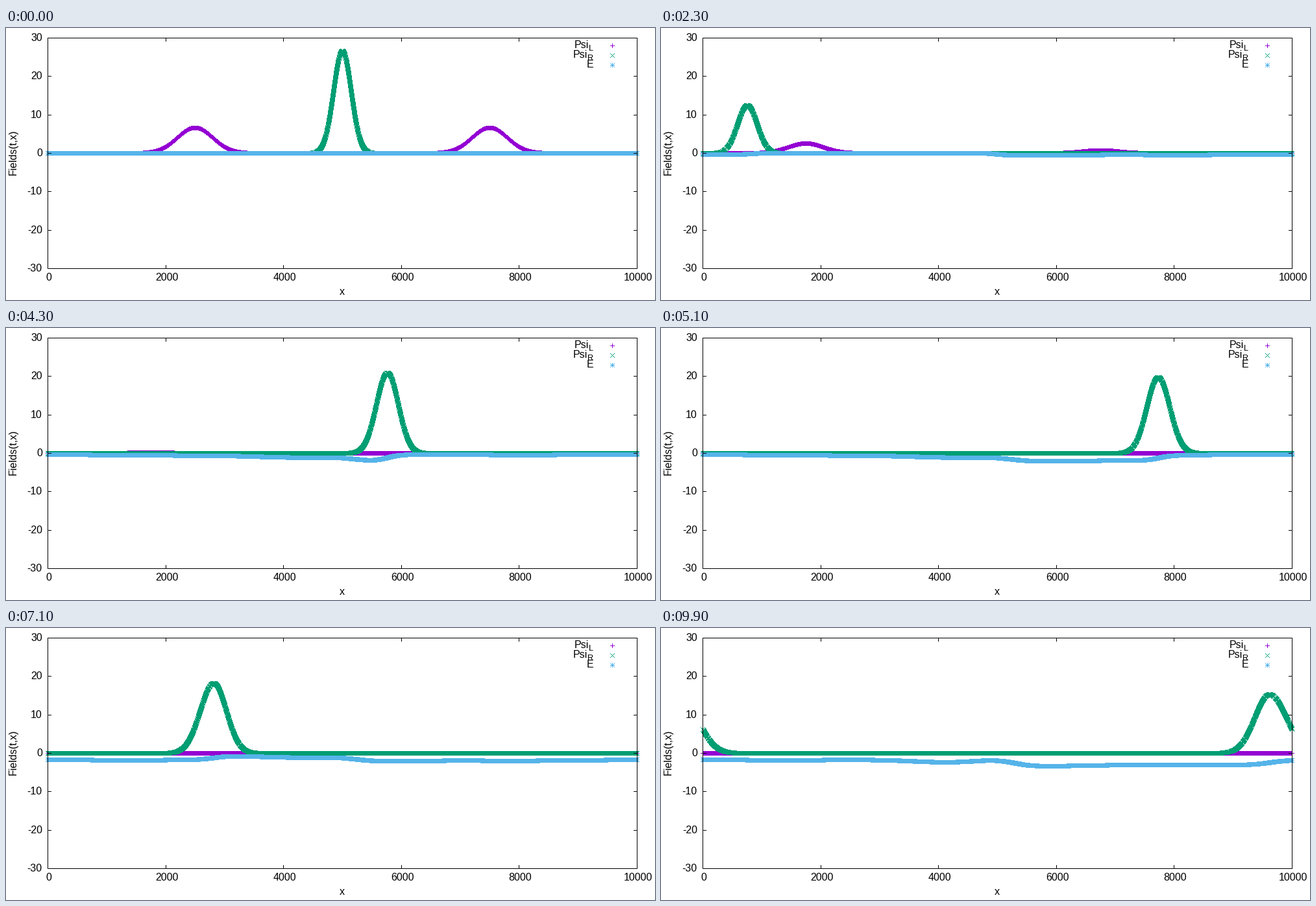
Write a matplotlib script that moves like this. It is 1000x420 px and loops after 10000 ms.

```python
import numpy as np
import matplotlib.pyplot as plt
from matplotlib.animation import FuncAnimation
from matplotlib.path import Path

W, H, DPI = 1000, 420, 100
FRAMES, INTERVAL = 100, 100
LEFT, RIGHT, TOP, BOTTOM = 64, 972, 15, 371
LENGTH, SPEED = 10000, 250
PX = 72 / DPI
PURPLE, GREEN, BLUE = "#9400d3", "#009e73", "#56b4e9"

# Key points, joined by cosine easing
AREA = ([0, 3, 7, 14, 24, 43, 60, 82, 99],
        [10000, 10000, 5500, 5220, 5180, 9750, 9550, 10700, 10280])
DRIFT = ([0, 43, 60, 82, 99], [0, 15, -65, 200, -130])
TRAIL = ([5000, 7000, 8000, 9000, 10000, 12500, 14600, 15000, 15600,
          20000, 23100, 24000, 25000, 25800, 27600, 30000],
         [0.33, 0.33, 0.5, 0.38, 0.38, 0.6, 1.18, 1.08, 1.65,
          1.38, 1.12, 1.25, 0.7, 1.35, 1.1, 1.35])

plt.rcParams["font.family"] = "Liberation Sans"
fig = plt.figure(figsize=(W / DPI, H / DPI), dpi=DPI, facecolor="white")
ax = fig.add_axes([0, 0, 1, 1])
ax.set_xlim(0, W)
ax.set_ylim(H, 0)
ax.axis("off")

x = np.arange(LENGTH + 1)


def glide(keys, t):
    ts, vs = map(np.array, keys)
    t = np.clip(t, ts[0], ts[-1])
    i = np.clip(np.searchsorted(ts, t, "right") - 1, 0, len(ts) - 2)
    s = (t - ts[i]) / (ts[i + 1] - ts[i])
    return vs[i] + (vs[i + 1] - vs[i]) * (1 - np.cos(np.pi * s)) / 2


def step(z):
    return 0.5 * (1 + np.tanh(0.851 * z))


def bell(center, left, right):
    d = (x - center + LENGTH / 2) % LENGTH - LENGTH / 2
    return np.exp(-0.5 * (d / np.where(d < 0, left, right)) ** 2)


def width(t):
    return 150 + 0.55 * t + 0.0065 * t ** 2


def front(t):
    return 5000 + SPEED * t + glide(DRIFT, t)


def psi_left(t):
    # each meeting with the right mover changes the strength
    a = (1 - 0.62 * step(t - 5)) * (1 + 0.4 * step(t - 25))
    a *= 1 - step((t - 37) / 2.2)
    b = (1 - 0.88 * step(t - 14)) * (1 - 0.78 * step((t - 32) / 6))
    b *= t < 44
    peak = 5000 / (300 * np.sqrt(2 * np.pi))
    return peak * (a * bell(7500 - SPEED * t, 300, 300)
                   + b * bell(2500 - SPEED * t, 300, 300))


def psi_right(t):
    w, skew = width(t), glide(DRIFT, t) / 2000
    peak = glide(AREA, t) / (w * np.sqrt(2 * np.pi))
    return peak * bell(front(t), w * (1 + skew), w * (1 - skew))


def field(t):
    # the right mover leaves a deeper field behind on every lap
    total = np.zeros(len(x))
    for lap in range(3):
        u = x + lap * LENGTH
        depth = glide(TRAIL, u)
        if lap == 0:
            depth = depth + 0.2 * step((12500 - SPEED * t - x) / 300)
        total -= depth * (step((u - 5000) / 150)
                          - step((u - front(t)) / width(t)))
    return total


def to_px(values):
    col = np.rint(LEFT + x * (RIGHT - LEFT) / LENGTH).astype(int)
    row = np.rint(193 - values * (BOTTOM - TOP) / 60).astype(int)
    code = np.unique(col * 1000 + row)
    return code // 1000, code % 1000


def box(px, py, w=1, h=1):
    return Path([(px, py), (px + w, py), (px + w, py + h), (px, py + h),
                 (px, py)], closed=True)


# Markers built from whole pixels, 7 by 7
PLUS = [box(-3, -1, 7, 1), box(0, -4, 1, 7)]
CROSS = [box(k, s * k - 1) for k in range(-3, 4) for s in (-1, 1)]


def points(shape, color, z):
    return ax.plot([], [], ls="none", marker=Path.make_compound_path(*shape),
                   ms=8 * PX, mew=0, mec="none", mfc=color, zorder=z)[0]


def line(xs, ys):
    ax.plot(xs, ys, color="black", lw=PX, antialiased=False, snap=True,
            solid_capstyle="projecting", solid_joinstyle="miter", zorder=8)


def label(px, py, text, ha="center", size=16, **kw):
    ax.text(px, py, text, ha=ha, va="baseline", fontsize=size * PX,
            color="black", zorder=9, **kw)


def draw_axes():
    line([LEFT, RIGHT, RIGHT, LEFT, LEFT], [TOP, TOP, BOTTOM, BOTTOM, TOP])
    for v in range(-30, 31, 10):
        py = round(193 - v * (BOTTOM - TOP) / 60)
        line([LEFT, LEFT + 5], [py, py])
        line([RIGHT - 5, RIGHT], [py, py])
        label(55.8, py + 5, str(v), "right")
    for v in range(0, LENGTH + 1, 2000):
        px = round(LEFT + v * (RIGHT - LEFT) / LENGTH)
        line([px, px], [BOTTOM - 5, BOTTOM])
        line([px, px], [TOP, TOP + 5])
        label(px + 2, 390, str(v))
    label(518, 412, "x")
    label(16, 191.5, "Fields(t,x)", rotation=90, rotation_mode="anchor")


def draw_legend():
    rows = [("Psi", "L", 898, PLUS, PURPLE), ("Psi", "R", 896, CROSS, GREEN),
            ("E", "", 905.5, PLUS + CROSS, BLUE)]
    for i, (name, sub, edge, shape, color) in enumerate(rows):
        py = 27 + 15 * i
        label(edge, py + 4, name, "right")
        label(edge, py + 8, sub, "left", 12.8)
        points(shape, color, 7).set_data([934], [py])


draw_axes()
draw_legend()
curves = [(points(PLUS, PURPLE, 2), psi_left),
          (points(CROSS, GREEN, 3), psi_right),
          (points(PLUS + CROSS, BLUE, 4), field)]


def update(t):
    for pts, rule in curves:
        pts.set_data(*to_px(rule(t)))
    return [pts for pts, _ in curves]


anim = FuncAnimation(fig, update, frames=FRAMES, interval=INTERVAL,
                     repeat=True, repeat_delay=0)
plt.show()
```
